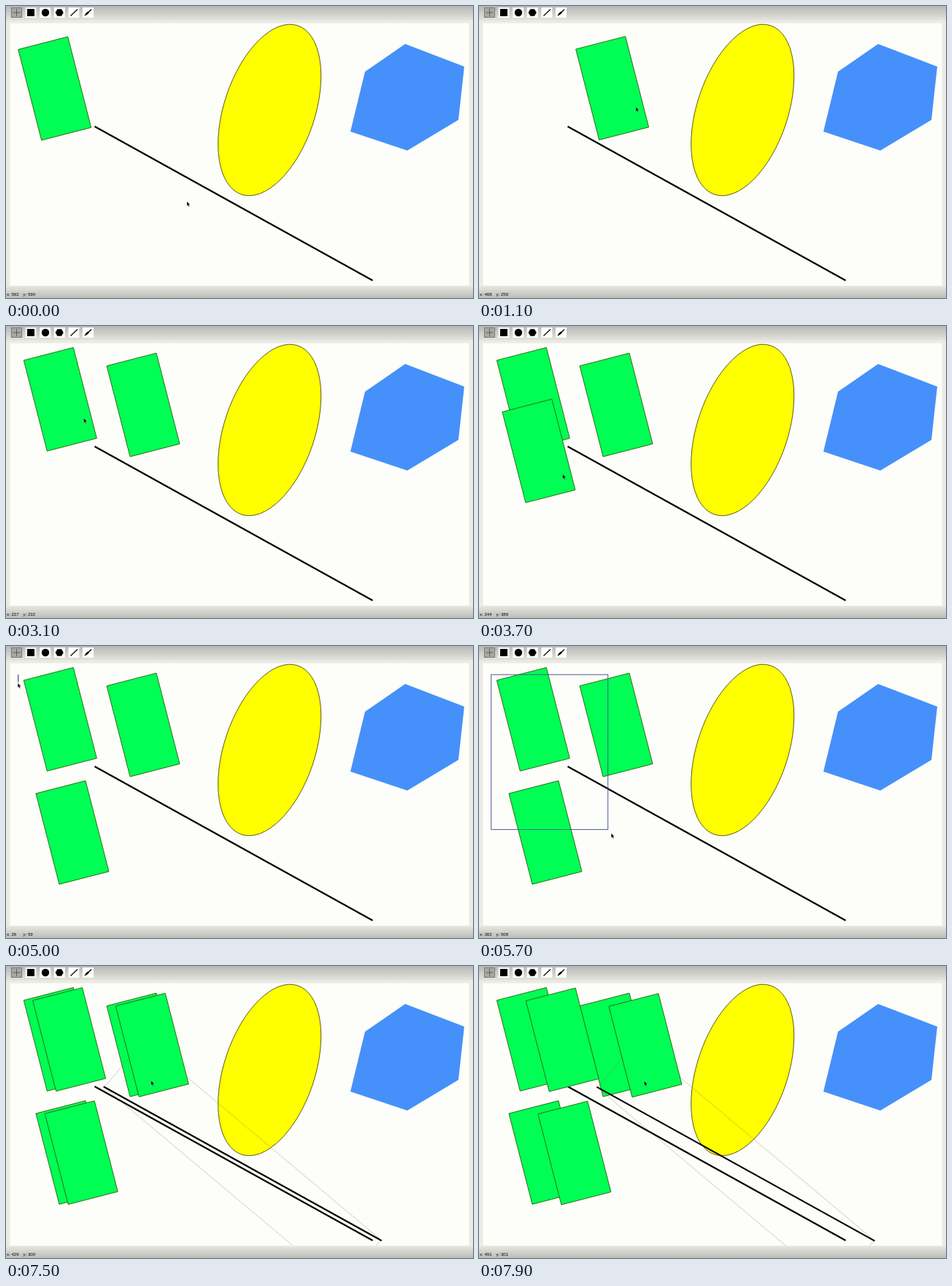
Animation of 640 by 400 pixels, one loop 8 s. Source, as an HTML page with a canvas:

```html
<!DOCTYPE html>
<html lang="en">
<head>
<meta charset="utf-8">
<title>Drawing board</title>
<style>
html, body { margin: 0; width: 100%; height: 100%; overflow: hidden; }
canvas { display: block; width: 640px; height: 400px; }
</style>
</head>
<body>
<canvas id="stage" width="640" height="400"></canvas>
<script>
const ctx = document.getElementById('stage').getContext('2d');
const LOOP = 8000, STEP = 100, LEAD = 22, SCALE = 2.225;
const BOARD = [5.5, 23.5, 629, 359.5];
const GRAB = 350, COPY = 1700, COPY_AGAIN = 3300, MARQUEE = 4900, SELECTED = 5950, COPY_ALL = 7150;

// Pointer gestures in board units; each eases from where the last one ended
const origin = [974, 920];
const moves = [
  { from: -250, to: 250, x: 210, y: 260 },
  { from: GRAB, to: 1100, x: 468, y: 259 },
  { from: 1100, to: 1500, x: 480, y: 249 },
  { from: COPY, to: 2450, x: 227, y: 249 },
  { from: 2450, to: 2900, x: 227, y: 232 },
  { from: COPY_AGAIN, to: 4150, x: 264, y: 577 },
  { from: 4250, to: 4800, x: 26, y: 36 },
  { from: MARQUEE, to: 5050, x: 26, y: 67 },
  { from: 5050, to: 5900, x: 440, y: 580 },
  { from: 6250, to: 6950, x: 402, y: 300 },
  { from: COPY_ALL, to: 8300, x: 525, y: 302 }
];

const clamp = (v, lo, hi) => Math.min(Math.max(v, lo), hi);
const ease = u => u * u * (3 - 2 * u);

function pointer(t) {
  let [x, y] = origin;
  for (const m of moves) {
    const k = ease(clamp((t - m.from) / (m.to - m.from), 0, 1));
    x += (m.x - x) * k;
    y += (m.y - y) * k;
  }
  return [x, y];
}

const toStage = ([x, y]) => [5 + x / SCALE, 23 + y / SCALE];
const add = (a, b) => [a[0] + b[0], a[1] + b[1]];

function dragged(t, from, to) {
  const a = pointer(from), b = pointer(clamp(t, from, to));
  return [(b[0] - a[0]) / SCALE, (b[1] - a[1]) / SCALE];
}

// Fill and stroke whatever outline the callback traces, moved by an offset
function paint(trace, { fill, stroke, width = 1, at = [0, 0], dash = [] }) {
  ctx.save();
  ctx.translate(...at);
  ctx.beginPath();
  trace();
  if (fill) { ctx.fillStyle = fill; ctx.fill(); }
  if (stroke) {
    ctx.setLineDash(dash);
    ctx.strokeStyle = stroke;
    ctx.lineWidth = width;
    ctx.stroke();
  }
  ctx.restore();
}

const poly = (pts, style) => paint(() => {
  pts.forEach(p => ctx.lineTo(...p));
  ctx.closePath();
}, style);

const line = (x0, y0, x1, y1, width, color = '#000', at) => paint(() => {
  ctx.moveTo(x0, y0);
  ctx.lineTo(x1, y1);
}, { stroke: color, width, at });

const oval = (x, y, rx, ry, turn, style) =>
  paint(() => ctx.ellipse(x, y, rx, ry, turn, 0, 7), style);

const tilted = (cx, cy, w, h, turn, style) => paint(() => {
  ctx.translate(cx, cy);
  ctx.rotate(turn);
  ctx.rect(-w / 2, -h / 2, w, h);
}, style);

function box(x, y, w, h, fill) {
  ctx.fillStyle = fill;
  ctx.fillRect(x, y, w, h);
}

const greenRect = at =>
  tilted(66.7, 113, 70.2, 128.4, -0.252, { fill: '#00ff55', stroke: '#2f6a10', width: 0.9, at });
const blackLine = at => line(121.5, 165, 502.5, 376, 2.2, '#000', at);
const selection = at =>
  tilted(312, 270.5, 424.8, 83.6, 0.698,
    { stroke: 'rgba(110,115,60,.65)', width: 0.7, at, dash: [2, 1] });

function gradient(y0, y1, c0, c1) {
  const g = ctx.createLinearGradient(0, y0, 0, y1);
  g.addColorStop(0, c0);
  g.addColorStop(1, c1);
  return g;
}

function drawWindow() {
  box(0, 0, 640, 400, '#ebebe4');
  box(0, 0, 640, 20, gradient(0, 20, '#b6b6b4', '#e6e6df'));
  box(0, 384, 640, 16, gradient(384, 400, '#e6e6df', '#bcbcb8'));
  box(...BOARD, '#fdfdfa');
}

function drawTools() {
  for (let i = 0; i < 6; i++) box(7 + i * 19.6, 2, 15, 14, i ? '#fdfdfa' : '#a9a9a4');
  ctx.strokeStyle = '#777';
  ctx.lineWidth = 1;
  ctx.strokeRect(7.5, 2.5, 14, 13);
  line(14.5, 4, 14.5, 14, 0.9, '#555');
  line(9.5, 9, 19.5, 9, 0.9, '#555');
  box(29, 4, 10, 10, '#000');
  oval(54, 9, 5.2, 5.2, 0, { fill: '#000' });
  const hexagon = Array.from({ length: 6 }, (_, i) =>
    [73.2 + 5.6 * Math.cos(i * Math.PI / 3), 9 + 5.6 * Math.sin(i * Math.PI / 3)]);
  poly(hexagon, { fill: '#000' });
  line(88.5, 13.5, 98, 4.5, 1.2);
  line(108, 13, 117, 4.8, 1.5);
  line(109.5, 11.6, 113, 8.4, 2.6);
}

function drawBoard(t, pos) {
  const first = dragged(t, GRAB, 1500);
  const second = add(first, dragged(t, COPY, 3000));
  const third = add(second, dragged(t, COPY_AGAIN, 4200));
  const group = dragged(t, COPY_ALL, LOOP);

  ctx.save();
  ctx.beginPath();
  ctx.rect(...BOARD);
  ctx.clip();

  blackLine();
  oval(361.2, 142.5, 62.3, 121.9, 0.321, { fill: '#ffff00', stroke: '#4c4a00', width: 0.9 });
  poly([[547, 52], [628, 83], [620, 156], [550, 198], [472, 172], [492, 90]],
    { fill: '#4590fa' });

  const rects = [first];
  if (t >= COPY) rects.push(second);
  if (t > COPY_AGAIN) rects.push(third);
  rects.forEach(greenRect);

  if (t > COPY_ALL) blackLine(group);
  if (t > SELECTED) selection(group);
  if (t > COPY_ALL) rects.forEach(at => greenRect(add(at, group)));

  if (t > MARQUEE && t < SELECTED) {
    const [x0, y0] = toStage(pointer(MARQUEE)), [x1, y1] = toStage(pos);
    ctx.strokeStyle = '#4a5a96';
    ctx.lineWidth = 1;
    ctx.strokeRect(x0, y0, x1 - x0, y1 - y0);
  }
  ctx.restore();
}

function drawStatus([x, y]) {
  ctx.fillStyle = '#000';
  ctx.font = '6.1px "Liberation Sans", Arial, sans-serif';
  ctx.fillText('x: ' + Math.round(x), 1, 396.5);
  ctx.fillText('y: ' + Math.round(y), 23.5, 396.5);
}

function drawCursor(at) {
  poly([[-0.5, -1], [-0.5, 5.2], [0.9, 4], [2, 6.4], [3, 6], [2, 3.7], [3.8, 3.5]],
    { fill: '#000', stroke: 'rgba(255,255,255,.6)', width: 0.4, at });
}

function draw(now) {
  const t = Math.floor(now % LOOP / STEP) * STEP;
  const pos = pointer(t);
  drawWindow();
  drawTools();
  drawBoard(t, pos);
  drawStatus(pos);
  drawCursor(toStage(pointer(t + LEAD)));
}

const start = performance.now();
function tick() {
  draw(performance.now() - start);
  requestAnimationFrame(tick);
}
tick();
</script>
</body>
</html>
```
